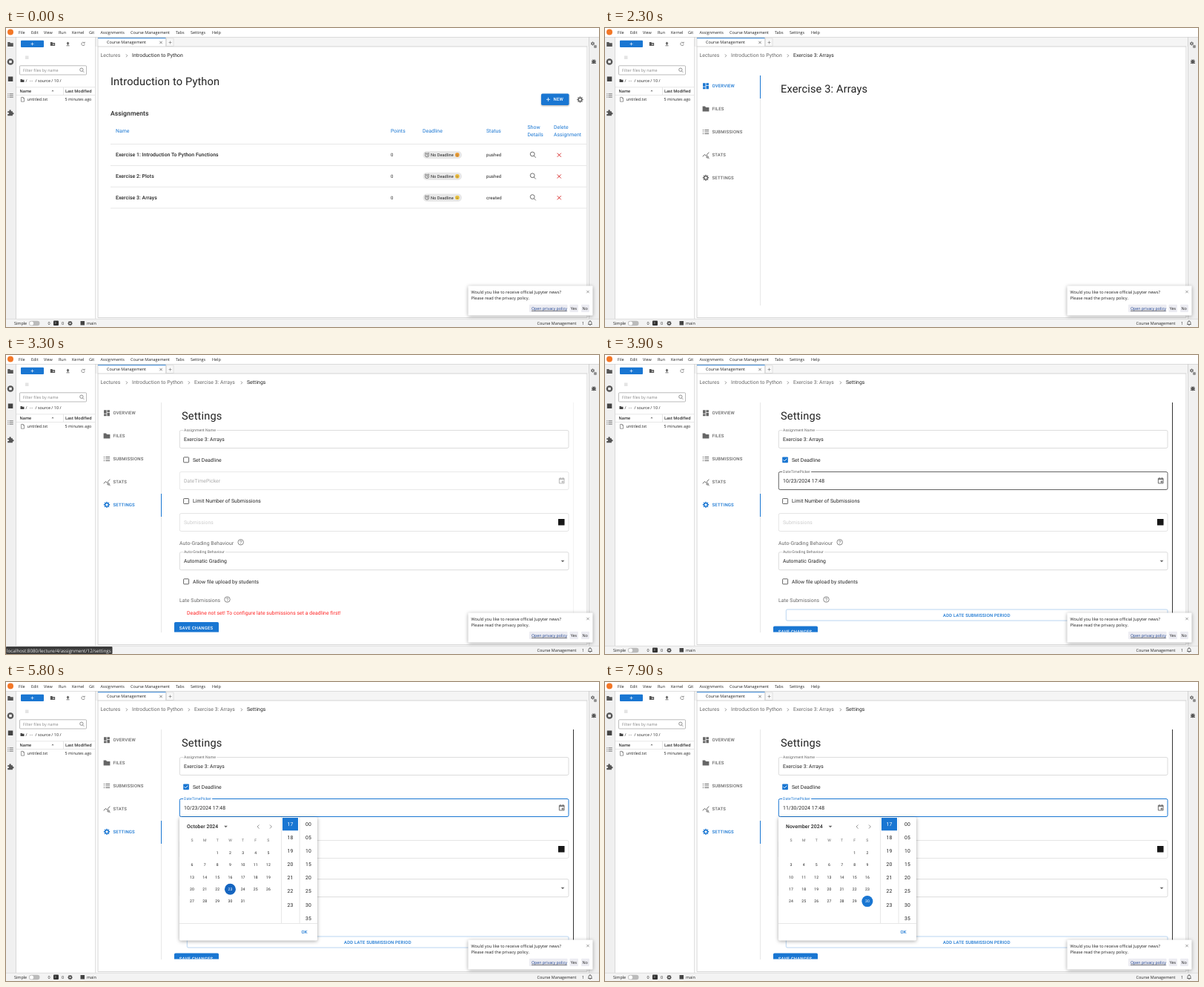
Recreate the animation shown at these times as an HTML page. Size 800 by 403 pixels, loop 8000 ms.

```html
<!DOCTYPE html>
<html lang="en">
<head>
<meta charset="utf-8">
<title>Course Management</title>
<style>
html, body { margin: 0; width: 100%; height: 100%; overflow: hidden; background: #fff; }
svg { display: block; width: 100vw; height: 100vh; }
text { font-family: Roboto, sans-serif; letter-spacing: .0094em; text-rendering: geometricPrecision; white-space: pre; }
.ui { font-family: "Open Sans", "Noto Sans", sans-serif; letter-spacing: 0; }
.b { font-weight: 500; }
.h { font-weight: 600; }
.btn { font-weight: 500; letter-spacing: .029em; }
.mid { text-anchor: middle; }
.label { paint-order: stroke; stroke: #fff; stroke-width: 3px; }
.paper { filter: drop-shadow(0 1.5px 2.5px rgba(0,0,0,.35)); }
</style>
</head>
<body>
<svg id="stage" viewBox="0 0 800 403" preserveAspectRatio="none"></svg>
<script>
const BLUE = '#1976d2', INK = '#222', GREY = '#666';
const PATHS = {
  search: 'M15 15l6 6M17 9.5a7 7 0 1 1-14 0a7 7 0 1 1 14 0',
  cross: 'M5 5L19 19M19 5L5 19',
  plus: 'M12 4v16M4 12h16',
  next: 'M9 5l7 7l-7 7',
  prev: 'M15 5l-7 7l7 7',
  caret: 'M6 9h12l-6 6z',
  up: 'M6 15h12l-6-6z',
  folder: 'M2 4h8l2 3h10v13H2z',
  file: 'M5 2h9l5 5v15H5zM14 2v5h5',
  list: 'M2 6h3M2 12h3M2 18h3M8 6h14M8 12h14M8 18h14',
  grid: 'M3 3h8v10H3zM13 3h8v6h-8zM3 15h8v6H3zM13 11h8v10h-8z',
  stats: 'M2 18l6-7l5 4l9-11M14 19a3 3 0 1 0 6 0a3 3 0 1 0-6 0M19 21l4 3',
  puzzle: 'M3 8h5V6a3 3 0 0 1 6 0v2h5v4h1a3 3 0 0 1 0 6h-1v4H3v-5h2a2 2 0 0 0 0-5H3z',
  calendar: 'M4 5h16v16H4zM4 8h16M8 2v4M16 2v4M13 14h4v4h-4z',
  help: 'M22 12a10 10 0 1 1-20 0a10 10 0 1 1 20 0M9 9.5a3 3 0 1 1 4.5 2.5q-1.5 1-1.5 2.5M12 17v2',
  alarm: 'M20 13a8 8 0 1 1-16 0a8 8 0 1 1 16 0M12 8v5l4 2M2 6l5-4M22 6l-5-4',
  bell: 'M4 18h16M6 18v-7a6 6 0 0 1 12 0v7M10 21h4M12 2v3',
  refresh: 'M19 13a7 7 0 1 1-2-6M19 3v5h-5',
  upload: 'M12 2l7 8h-4v6h-6v-6H5zM5 19h14v2H5z',
  bug: 'M8 9a4 4 0 0 1 8 0v6a4 4 0 0 1-8 0zM3 8h5M3 13h5M3 18h5M16 8h5M16 13h5M16 18h5M8 3l2 3M16 3l-2 3',
  gear: 'M17.5 12a5.5 5.5 0 1 1-11 0a5.5 5.5 0 1 1 11 0M12 2v4M12 18v4M2 12h4M18 12h4M5 5l3 3M16 16l3 3M19 5l-3 3M8 16l-3 3',
  check: 'M6 12l4 4l8-8',
};

const text = (s, x, y, size = 6.83, color = INK, cls = '') =>
  `<text x="${x}" y="${y + size * .355}" font-size="${size}" fill="${color}" class="${cls}">${s}</text>`;
const ui = (s, x, y, color = INK, cls = '', size = 5.45) => text(s, x, y, size, color, 'ui ' + cls);
const rect = (x, y, w, h, fill, more = '') =>
  `<rect x="${x}" y="${y}" width="${w}" height="${h}" fill="${fill}" ${more}/>`;
const box = (x, y, w, h, stroke, sw = .6, r = 2) =>
  rect(x, y, w, h, 'none', `rx="${r}" stroke="${stroke}" stroke-width="${sw}"`);
const hline = (x1, x2, y, c = '#ddd') => rect(x1, y, x2 - x1, .7, c);
const vline = (x, y1, y2, c = '#ddd') => rect(x, y1, .7, y2 - y1, c);
const disc = (x, y, r, fill, alpha = 1) =>
  `<circle cx="${x}" cy="${y}" r="${r}" fill="${fill}" opacity="${alpha}"/>`;
const icon = (name, x, y, size = 10, color = GREY, sw = 2, fill = 'none') =>
  `<path d="${PATHS[name]}" transform="translate(${x - size / 2} ${y - size / 2}) scale(${size / 24})" fill="${fill}" stroke="${color}" stroke-width="${sw}"/>`;
const solid = (name, x, y, size, color) => icon(name, x, y, size, color, 0, color);
const clip = (id, x, y, w, h, body) =>
  `<clipPath id="${id}">${rect(x, y, w, h, '#000')}</clipPath><g clip-path="url(#${id})">${body}</g>`;

const ramp = (t, a, b) => Math.min(1, Math.max(0, (t - a) / (b - a)));
// cubic-bezier(.4, 0, .2, 1)
function ease(x) {
  let lo = 0, hi = 1, s = .5;
  for (let i = 0; i < 24; i++) {
    s = (lo + hi) / 2;
    const u = 1 - s;
    if (1.2 * s * u * u + .6 * s * s * u + s ** 3 < x) lo = s; else hi = s;
  }
  return s * s * (3 - 2 * s);
}

function topAndSides() {
  const menu = [['File', 17], ['Edit', 34], ['View', 51], ['Run', 71], ['Kernel', 89], ['Git', 112],
    ['Assignments', 127.5], ['Course Management', 168], ['Tabs', 229], ['Settings', 249], ['Help', 278]];
  return rect(0, 0, 800, 403, '#fff') +
    rect(0, 12, 13, 380, '#f0f0f0') + rect(786, 12, 14, 380, '#f0f0f0') + rect(120, 12, 666, 13, '#f5f5f5') +
    hline(0, 800, 12, '#d0d0d0') + vline(13, 12, 392, '#c8c8c8') + vline(120.5, 12, 392, '#c8c8c8') + vline(786, 12, 392, '#c8c8c8') +
    disc(6, 5.5, 4, '#f37726') + menu.map(([s, x]) => ui(s, x, 6)).join('') +
    solid('folder', 6, 22, 9, '#555') +
    disc(6, 45.5, 4.3, '#555') + rect(4.3, 43.8, 3.4, 3.4, '#fff') +
    rect(2.8, 65.5, 6.5, 6.5, '#444') + icon('list', 6, 91, 9, '#555') + solid('puzzle', 6, 114, 10, '#555') +
    icon('gear', 791.5, 21, 6, '#555', 4) + icon('gear', 795, 25, 5, '#555', 4) + icon('bug', 793, 45.5, 8, '#555', 3, '#555') +
    rect(20, 16.8, 31, 9.3, BLUE, 'rx="1"') + icon('plus', 35.5, 21.5, 6, '#fff', 2.5) +
    solid('folder', 63, 21.5, 7.5, '#555') + icon('plus', 64, 22, 3.5, '#fff', 4) + solid('upload', 83.5, 21.5, 7, '#555') +
    icon('refresh', 104, 21.5, 7.5, '#555') + rect(26, 37.5, 4.5, 4.5, '#e4e4e4') +
    box(18.5, 50.8, 90, 12.2, '#aaa', .8, 1) + ui('Filter files by name', 23, 57, '#888') + icon('search', 102.5, 57, 7.5, '#555') +
    solid('folder', 22, 71, 6, '#444') + ui('/  ⋯  / source / 10 /', 26.5, 71) +
    hline(14, 120, 79.5) + hline(14, 120, 90) + vline(77, 80, 90) +
    ui('Name', 18.5, 85, INK, 'h') + solid('up', 63, 84.5, 6, '#555') + ui('Last Modified', 80, 85, INK, 'h') +
    icon('file', 22.5, 96.3, 7, '#555') + ui('untitled.txt', 28.5, 96.3) + ui('5 minutes ago', 79.5, 96.3) +
    rect(124, 13, 91.5, 12.5, '#fff', 'stroke="#c8c8c8" stroke-width=".6"') + rect(124, 13.3, 91.5, .9, BLUE) +
    ui('Course Management', 136, 19.5) + icon('cross', 209, 19.5, 6, '#444', 2.5) +
    rect(216.5, 14, 9.5, 10.5, '#f8f8f8', 'stroke="#ccc" stroke-width=".5"') + icon('plus', 221.5, 19.5, 6, '#555') +
    rect(124, 25, 660, 365.5, '#fff', 'stroke="#c4c4c4" stroke-width=".7"');
}

function statusBar(url) {
  return rect(0, 392, 800, 11, '#f3f3f3') + hline(0, 800, 391.8, '#d4d4d4') +
    ui('Simple', 11, 398) + rect(31, 394.8, 14.5, 6.5, '#bbb', 'rx="3.25"') + disc(34.5, 398, 2.6, '#fff') +
    ui('0', 56.5, 398) + rect(64, 394.5, 7, 6.5, '#333', 'rx="1"') + icon('next', 66.5, 397.5, 4.5, '#fff', 3) +
    ui('0', 75, 398) + icon('gear', 86.5, 398, 7.5, '#444', 4) + rect(100.5, 395, 5.5, 5.5, '#444') + ui('main', 109, 398) +
    ui('Course Management', 716.5, 398) + ui('1', 777, 398) + icon('bell', 788, 397.5, 8, '#333') +
    (url ? rect(0, 393, 143.5, 10, '#3c3c3c', 'rx="1"') +
      ui('localhost:8080/lecture/4/assignment/12/settings', 1, 398.5, '#eee', '', 6.25) : '');
}

function newsToast() {
  const key = (x, w) => rect(x, 372.8, w, 10.2, '#ececf2', 'rx="1"');
  return `<g class="paper">${rect(623.5, 347.5, 168, 40, '#fff', 'rx="1"')}</g>` +
    ui('Would you like to receive official Jupyter news?', 627.5, 356, INK, '', 5.63) +
    ui('Please read the privacy policy.', 627.5, 364.2, INK, '', 5.63) + icon('cross', 785, 355.5, 6, '#444') +
    key(706, 51.5) + key(760.5, 11.5) + key(776, 11) +
    `<g text-decoration="underline">${ui('Open privacy policy', 709, 378, '#1a3f8f', '', 5.25)}</g>` +
    ui('Yes', 761.8, 378) + ui('No', 777.5, 378);
}

function breadcrumb(count) {
  const items = [['Lectures', 127.5], ['Introduction to Python', 170], ['Exercise 3: Arrays', 254], ['Settings', 325]];
  return items.slice(0, count).map(([s, x], i) =>
    text(s, x, 37, 6.83, i == count - 1 ? INK : GREY) + (i ? icon('next', x - 7.3, 37.3, 6.5, '#666', 2.5) : '')).join('');
}

function lecturePage(t) {
  const rows = [['Exercise 1: Introduction To Python Functions', 'pushed', '#f2a33a'],
    ['Exercise 2: Plots', 'pushed', '#f0c040'], ['Exercise 3: Arrays', 'created', '#f0c840']];
  const heads = [['Name', 148, 139], ['Points', 519, 139], ['Deadline', 562, 139], ['Status', 648, 139],
    ['Show', 703.5, 133.5], ['Details', 703.5, 144], ['Delete', 739, 133.5], ['Assignment', 739, 144]];
  let out = breadcrumb(2) + text('Introduction to Python', 141, 72, 14.6) +
    `<g class="paper" style="filter:drop-shadow(0 1px 1px #0005)">${rect(722, 88.5, 37.5, 15.5, BLUE, 'rx="1.7"')}</g>` +
    icon('plus', 731.5, 96.3, 7.5, '#fff', 2.5) + text('NEW', 738.5, 96.3, 5.98, '#fff', 'btn') +
    icon('gear', 774.5, 96.5, 10, '#666', 3.3) +
    text('Assignments', 141, 115.3, 8.6, INK, 'b') + heads.map(([s, x, y]) => text(s, x, y, 6.83, BLUE)).join('') +
    hline(141, 783, 156.2);
  out += rect(141, 214.5, 642, 28, '#f1f8f5', `opacity="${ramp(t, 500, 900)}"`);
  // The page freezes at 1600 until the next view has loaded.
  if (t >= 1400)
    out += clip('row', 141, 214.5, 642, 28, disc(462, 230, 327 * ease(ramp(Math.min(t, 1600), 1400, 1950)), '#000', .14));
  rows.forEach(([name, state, face], i) => {
    const y = 171 + i * 28.8;
    out += text(name, 148, y, 6.83, INK, 'b') + text('0', 519, y, 6) +
      rect(562.5, y - 5, 52.5, 10.3, '#e8e8e8', 'rx="5.1"') + icon('alarm', 568, y, 7.5, '#444') +
      text('No Deadline', 573, y + .2, 5.6) + disc(608.8, y, 2.9, face) +
      disc(607.8, y - .7, .45, '#543') + disc(609.8, y - .7, .45, '#543') + rect(607.5, y + .9, 2.6, .5, '#543') +
      text(state, 648, y, 6.05) + icon('search', 711, y, 10, '#555') + icon('cross', 746.3, y + .2, 8.7, '#d93030', 2.7) +
      hline(141, 783, 185 + i * 28.8);
  });
  return out;
}

function tabs(t) {
  const names = [['OVERVIEW', 'grid'], ['FILES', 'folder'], ['SUBMISSIONS', 'list'], ['STATS', 'stats'], ['SETTINGS', 'gear']];
  const active = t < 2600 ? 0 : 4;
  let out = vline(209.3, 64, 374);
  if (t >= 2500 && t < 3300)
    out += clip('tab', 125, 187, 84, 30.5, disc(164.5, 202, 49.5 * ease(ramp(t, 2500, 3050)), BLUE, .21 * (1 - ramp(t, 2800, 3300))));
  names.forEach(([name, glyph], i) => {
    const y = 78.2 + i * 30.9, c = i == active ? BLUE : GREY;
    out += (i < 2 ? solid(glyph, 136, y, 10.5, c) : icon(glyph, 136, y, 10, c, i == 4 ? 3.3 : 2.3)) +
      text(name, 144.5, y, 5.98, c, 'btn');
  });
  return out + rect(209, 64 + 123 * ease(ramp(t, 2700, 3000)), 1, 31, BLUE);
}

const checkbox = (y, label, on) =>
  (on ? rect(239.2, y - 3.8, 7.7, 7.7, BLUE, 'rx=".8"') + icon('check', 243, y, 9.5, '#fff', 2.3)
    : box(239.6, y - 3.5, 7, 7, '#555', .9, .7)) + text(label, 252, y);

const outline = (y, stroke, sw) => box(234.3, y, 524.7, 24, stroke, sw);
const field = (y, label, value, stroke = '#c4c4c4', sw = .6, labelColor = GREY) =>
  outline(y, stroke, sw) + text(label, 240, y - .3, 5.13, labelColor, 'label') + text(value, 240, y + 11.7);

function settingsPage(t) {
  const on = t >= 3600, open = t >= 4800, hover = t >= 3900;
  const date = t >= 7500 ? '11/30/2024 17:48' : '10/23/2024 17:48';
  let body = text('Settings', 237, 82, 14.6) + field(101.5, 'Assignment Name', 'Exercise 3: Arrays');
  if (t >= 3500 && t < 3900) body += disc(243, 141, 8.5, BLUE, t < 3600 ? .05 : .2 * (1 - ramp(t, 3600, 3900)));
  body += checkbox(141.3, 'Set Deadline', on);
  body += on
    ? field(157.5, 'DateTimePicker', date, open ? BLUE : hover ? INK : '#c4c4c4', open ? 1 : hover ? .7 : .6, open ? BLUE : GREY)
    : outline(157.5, '#d8d8d8', .6) + text('DateTimePicker', 240, 169.2, 6.83, '#aaa');
  const press = t >= 4800 ? .12 * (1 - ramp(t, 5000, 5500)) : 0;
  const over = t >= 4200 ? .06 * (1 - ramp(t, 5200, 5600)) : 0;
  body += disc(749.7, 169.2, 7.5, '#000', over + press) + icon('calendar', 749.7, 169.2, 10, on ? '#555' : '#aaa') +
    checkbox(197, 'Limit Number of Submissions', false) +
    outline(213.5, '#d4d4d4', .6) + text('Submissions', 240, 225.2, 6.83, '#ccc') + rect(745, 221, 8.5, 8.5, '#111');
  for (let i = 0; i < 9; i++) body += rect(746.7 + i % 3 * 2.2, 222.7 + (i / 3 | 0) * 2.2, .6, .6, '#777');
  body += text('Auto-Grading Behaviour', 234, 253.7, 6.83, GREY) + icon('help', 316.7, 252.3, 9) +
    field(265.7, 'Auto-Grading Behaviour', 'Automatic Grading') + solid('caret', 751, 278, 9.5, GREY) +
    checkbox(305.3, 'Allow file upload by students', false) +
    text('Late Submissions', 234, 331, 6.83, GREY) + icon('help', 298.5, 329.5, 9) +
    (on ? box(244.3, 343, 514.7, 15, '#8cbae8', .6, 1.7) + text('ADD LATE SUBMISSION PERIOD', 456, 350.6, 5.98, BLUE, 'btn')
      : text('Deadline not set! To configure late submissions set a deadline first!', 244, 348, 6.83, '#f22'));
  const y = on ? 365.4 : 360;
  body += rect(227, y, 60, 15.5, BLUE, 'rx="1.7"') + text('SAVE CHANGES', 233.7, y + 7.5, 5.98, '#fff', 'btn') +
    (on ? rect(765, 64, 1, 299, '#333') : vline(765, 64, 374, '#eee'));
  return clip('form', 211, 60, 560, 313.5, body);
}

// Days of one month; start is the weekday of the 1st.
function month(start, count, picked, color, dx) {
  let out = '';
  for (let d = 1; d <= count; d++) {
    const cell = start + d - 1, x = 251 + cell % 7 * 17.15 + dx, y = 230 + (cell / 7 | 0) * 16.4;
    if (d == picked) out += disc(x, y, 7.5, color);
    out += text(d, x, y, 5.13, d == picked ? '#fff' : INK, 'mid');
  }
  return out;
}

function picker(t) {
  const grow = t < 4900 ? 0 : [.2, .65, .9][(t - 4900) / 100] ?? 1;
  if (!grow) return '';
  const size = t < 5000 ? .86 : t < 5100 ? .973 : 1;
  const slide = ease(ramp(t, 6000, 6400)), november = slide > .5;
  const pad = n => String(n).padStart(2, '0');
  let body = `<g class="paper">${rect(234, 182, 186, 166.5, '#fff', 'rx="1.7"')}</g>` +
    text(november ? 'November 2024' : 'October 2024', 244, 195, 6.83, INK, 'b') + solid('caret', november ? 304 : 296.5, 195, 9.5, GREY) +
    disc(357, 195, 7, '#000', t >= 5900 && t < 6500 ? .05 : 0) +
    icon('prev', 340.5, 195, 8.5, GREY) + icon('next', 357, 195, 8.5, GREY);
  [...'SMTWTFS'].forEach((s, i) => body += text(s, 251 + i * 17.15, 213, 5.13, GREY, 'mid'));
  let days = slide < 1 ? month(2, 31, 23, t < 5100 ? BLUE : '#1565c0', -123 * slide) : '';
  if (slide) {
    if (t >= 7300 && t < 7500) days += disc(353.9, 295.6, 7.5, BLUE, .08);
    days += month(5, 30, t >= 7500 ? 30 : 0, t < 7800 ? '#1565c0' : BLUE, 123 * (1 - slide));
  }
  body += clip('days', 241, 221, 123, 84, days) + vline(371.3, 182, 325) + vline(395.7, 182, 325) + hline(234, 420, 325) +
    rect(373, 183, 21, 17.2, BLUE);
  for (let i = 0; i < 8; i++) {
    const y = 191.8 + i * 18.05;
    if (i < 7) body += text(17 + i, 383.5, y, 6.83, i ? INK : '#fff', 'mid');
    body += text(pad(i * 5), 408, y, 6.83, INK, 'mid');
  }
  body += text('OK', 402.5, 336.5, 5.98, BLUE, 'btn mid');
  return `<g opacity="${grow}" transform="translate(327 182) scale(${size} ${size * size}) translate(-327 -182)">${body}</g>`;
}

function scene(t) {
  const page = t < 1900 ? lecturePage(t)
    : t < 2600 ? breadcrumb(3) + tabs(t) + (t < 2300 ? '' : text('Exercise 3: Arrays', 237, 82, 14.6))
    : breadcrumb(4) + tabs(t) + settingsPage(t) + picker(t);
  return topAndSides() + page + statusBar(t >= 2500 && t < 3400) + newsToast();
}

const stage = document.getElementById('stage');
let shown = -1;
function frame() {
  const t = Math.floor(performance.now() % 8000 / 100) * 100;
  if (t != shown) stage.innerHTML = scene(shown = t);
  requestAnimationFrame(frame);
}
frame();
</script>
</body>
</html>
```
